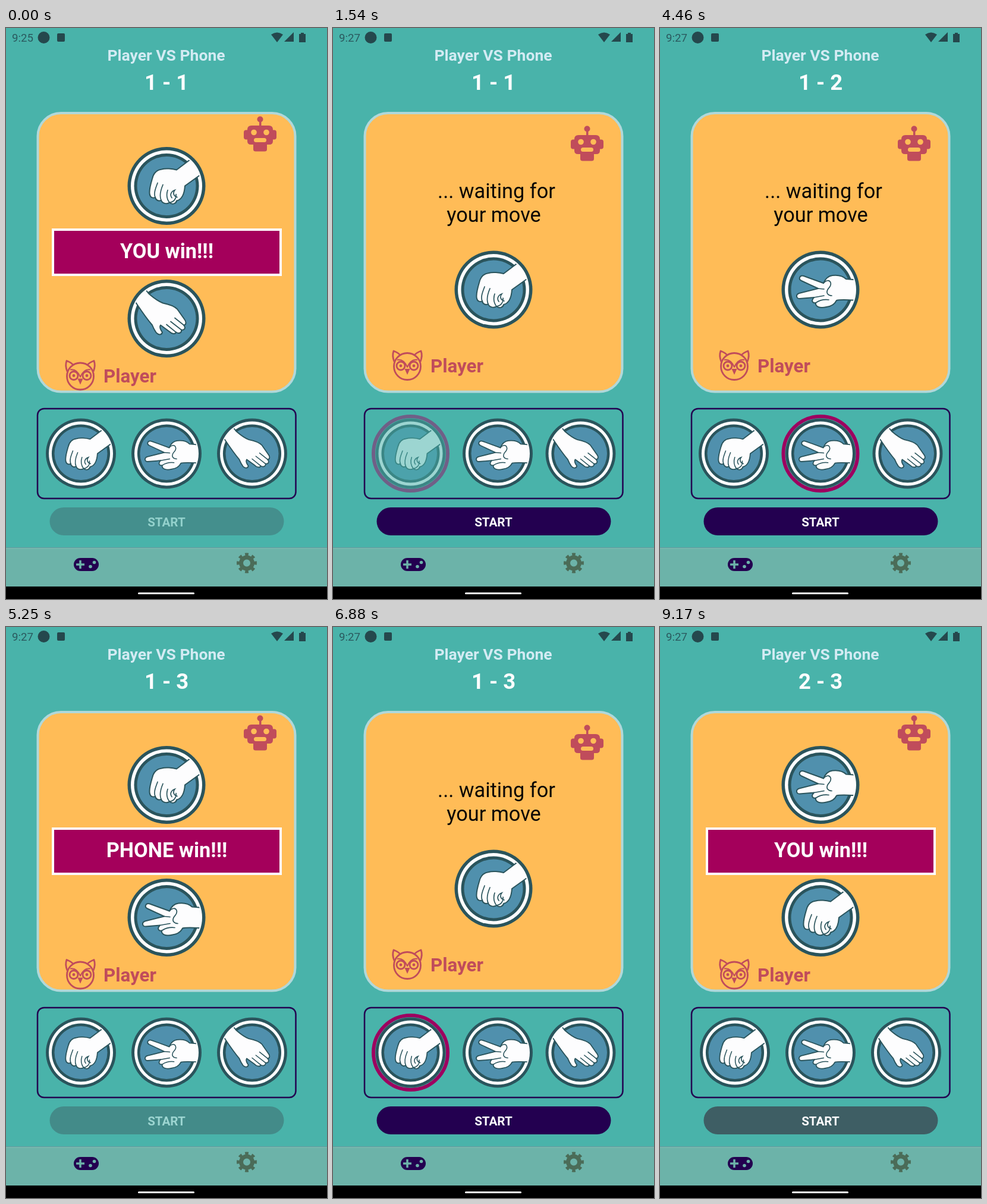
Animation, 540 px wide and 960 px high, one loop 9.21 s. Source, as an HTML page:

```html
<!DOCTYPE html>
<html lang="en">
<head>
<meta charset="utf-8">
<title>Hand game</title>
<style>
  html, body { margin: 0; width: 100%; height: 100%; overflow: hidden; background: #49b3aa; }
  svg { display: block; width: 100%; height: 100%; }
  text { font-family: Roboto, sans-serif; font-weight: 700; }
  .mid { text-anchor: middle; }
  .plain { font-weight: 400; }
  .line { fill: none; stroke: #2a545c; stroke-width: 1.7; stroke-linecap: round; }
  .hand { fill: #fdfdfe; stroke: #2a545c; stroke-width: 2; stroke-linejoin: round; }
  .owl { fill: none; stroke: #c04c5b; stroke-width: 2.8; stroke-linejoin: round; }
</style>
</head>
<body>
<svg viewBox="0 0 540 960">
  <defs>
    <clipPath id="inside"><circle r="58"/></clipPath>
    <g id="disc">
      <circle r="65.5" fill="#2a545c"/>
      <circle r="60" fill="#fdfdfe"/>
      <circle r="54.5" fill="#2a545c"/>
      <circle r="49.5" fill="#5090ad"/>
    </g>
    <g id="rock">
      <use href="#disc"/>
      <g clip-path="url(#inside)">
        <path class="hand" d="M17-27C10-29-2-30-8-28C-17-27-22-21-24-12C-27-2-30 9-28 15C-27 20-22 21-19 19C-18 25-12 26-9 24C-7 30 1 31 5 28C10 32 16 30 17 25C26 23 30 14 31 0L70-28L50-52Z"/>
        <path class="line" d="M-19 19C-22 12-18 3-15-5M-9 24C-13 15-9 5-6-2M5 28C-1 20 0 13 2 7M5 28C12 27 17 22 16 14M9 20C5 15 8 9 14 7C10 12 12 17 18 19"/>
      </g>
    </g>
    <g id="paper">
      <use href="#disc"/>
      <g clip-path="url(#inside)">
        <path class="hand" d="M-64-42L-44-60L-30-42C-22-35-14-29-6-26C4-24 13-21 18-16L30 1C34 6 33 11 29 11C33 16 30 20 25 19C26 24 21 26 16 23C15 27 9 26 5 22L-10 11C-12 14-10 19-7 23C-8 28-13 28-17 24C-20 20-22 16-24 11C-30 4-41-11-51-26Z"/>
        <path class="line" d="M29 11L14-1M25 19L7 5M16 23L0 10"/>
      </g>
    </g>
    <g id="scissors">
      <use href="#disc"/>
      <g clip-path="url(#inside)">
        <path class="hand" d="M66-16L43-18C38-23 29-25 20-24C12-23 8-18 5-11L-28-23C-35-25-38-18-32-15L-4-2L-36 6C-42 8-41 15-35 15L-11 13C-16 18-14 23-8 22C-9 28-2 32 10 29C19 28 24 24 27 18C34 16 42 17 66 18Z"/>
        <path class="line" d="M-4-2L6-1M5-11C9-16 15-17 17-12C19-6 14-4 12 0C9 6 13 10 19 10M-11 13L6 10M-8 22C-2 18 6 16 14 17"/>
      </g>
    </g>
  </defs>

  <rect width="540" height="960" fill="#49b3aa"/>

  <!-- status bar -->
  <g fill="#25484d">
    <text id="clock" class="plain" x="10" y="23" font-size="18.6" fill="#2b5a5f"></text>
    <circle cx="63.500" cy="16" r="10"/>
    <rect x="86" y="9" width="13" height="14" rx="2"/>
    <path d="M446 11Q456 4 466 11L456 24Z"/>
    <path d="M484 7V23H468Z"/>
    <path d="M493 10H496V8H501V10H504V24H493Z"/>
  </g>

  <text class="mid" x="269.500" y="55" font-size="26.5" fill="#d3ebf3">Player VS Phone</text>
  <text id="score" class="mid" x="270" y="104" font-size="36.5" fill="#fdfdfe"></text>

  <!-- board -->
  <rect x="53.500" y="143" width="433" height="468.500" rx="39" fill="#ffbc57" stroke="#b0d8da" stroke-width="4"/>
  <g id="robot" fill="#c04c5b">
    <circle cx="427.500" cy="169.500" r="5"/>
    <rect x="426" y="170" width="3.500" height="12"/>
    <rect x="400" y="187.500" width="55" height="16" rx="4"/>
    <path d="M413 180H442Q449 180 449 187V206Q449 212 443 212H412Q406 212 406 206V187Q406 180 413 180Z"/>
    <path d="M416 208H439V220Q439 223.500 435 223.500H420Q416 223.500 416 220Z"/>
    <g fill="#ffbc57">
      <circle cx="417" cy="191.500" r="4.800"/>
      <circle cx="438" cy="191.500" r="4.800"/>
      <rect x="417" y="201" width="21" height="7" rx="3.500"/>
    </g>
  </g>
  <g id="player">
    <g class="owl">
      <circle cx="125" cy="569" r="22.500"/>
      <path d="M103 561Q99 551 102 543Q110 546 113 550M147 561Q151 551 148 543Q140 546 137 550"/>
      <path d="M108 558Q119 556 125 570Q131 556 142 558" stroke-width="2"/>
      <circle cx="114" cy="568" r="7"/>
      <circle cx="136" cy="568" r="7"/>
    </g>
    <g fill="#c04c5b">
      <circle cx="114" cy="568" r="2.400"/>
      <circle cx="136" cy="568" r="2.400"/>
      <path d="M120.500 573H129.500L125 583Z"/>
      <text x="164" y="579" font-size="31.300">Player</text>
    </g>
  </g>

  <g id="waiting">
    <text class="mid plain" font-size="34.300" fill="#0b0805"><tspan x="275" y="286">... waiting for</tspan><tspan x="270.500" y="326">your move</tspan></text>
    <use id="chosen" transform="translate(270 440)"/>
  </g>
  <g id="result">
    <use id="theirs" transform="translate(270 265.500)"/>
    <use id="mine" transform="translate(270 488.500)"/>
    <rect x="79" y="339" width="383" height="76" fill="#a4005b" stroke="#fdfdfe" stroke-width="4"/>
    <text id="verdict" class="mid" x="270.500" y="387" font-size="34.300" fill="#fdfdfe"></text>
  </g>

  <!-- moves -->
  <rect x="53" y="640" width="434.500" height="151" rx="11" fill="none" stroke="#230050" stroke-width="2.500"/>
  <g id="moves"></g>

  <g id="start">
    <rect id="pill" x="73.500" y="806" width="394" height="47" rx="23.500"/>
    <text class="mid" x="270" y="838" font-size="20.700" fill="#fdfdfe">START</text>
  </g>

  <!-- tab bar -->
  <rect y="874" width="540" height="65" fill="#6cb3a9"/>
  <rect y="873" width="540" height="1.500" fill="#5f9c9f"/>
  <rect y="874.500" width="540" height="1" fill="#86bfb5"/>
  <rect x="114" y="891" width="42" height="22" rx="11" fill="#230050"/>
  <path d="M118 902H132M125 895V909" stroke="#6cb3a9" stroke-width="3.500"/>
  <g fill="#6cb3a9"><circle cx="142" cy="905.500" r="2.800"/><circle cx="148.500" cy="898.500" r="2.800"/></g>
  <g transform="translate(405 899.500)" fill="none" stroke="#4b6c58">
    <circle r="9.500" stroke-width="7"/>
    <circle r="14.200" stroke-width="5.500" pathLength="80" stroke-dasharray="5 5" stroke-dashoffset="2.500"/>
  </g>
  <rect y="939" width="540" height="21"/>
  <rect x="222" y="949" width="95" height="3" rx="1.500" fill="#fdfdfe"/>
</svg>

<script>
  const LOOP = 9210, PRESS = 150, RELEASE = 250, DIM = 0.2;
  const moves = ['rock', 'scissors', 'paper'];
  // Each round: result shown at `at`, next move tapped at `next`.
  const rounds = [
    { at: -90, next: 1440, score: '1 - 1', who: 'YOU', theirs: 'rock', mine: 'paper' },
    { at: 2450, next: 4000, score: '1 - 2', who: 'PHONE', theirs: 'paper', mine: 'rock' },
    { at: 5150, next: 6480, score: '1 - 3', who: 'PHONE', theirs: 'rock', mine: 'scissors' },
    { at: 7380, next: Infinity, score: '2 - 3', who: 'YOU', theirs: 'scissors', mine: 'rock' }
  ];
  const centers = { none: [126, 270, 414], rock: [130.5, 277, 416.5], scissors: [124, 270, 416.5] };

  const $ = id => document.getElementById(id);
  const show = (id, on) => $(id).setAttribute('display', on ? 'inline' : 'none');
  const shift = (id, y) => $(id).setAttribute('transform', `translate(0 ${y})`);
  const ease = p => p < 0.5 ? 2 * p * p : 1 - 2 * (1 - p) ** 2;

  // Opacity of a touchable around a tap released at `tap`.
  function tapOpacity(t, tap) {
    const d = t - tap;
    if (d <= -PRESS || d >= RELEASE) return 1;
    const level = d < 0 ? -d / PRESS : d / RELEASE;
    return DIM + (1 - DIM) * ease(level);
  }

  $('moves').innerHTML = moves.map(m =>
    `<g id="move-${m}"><circle r="62.5" fill="none" stroke="#9d0060" stroke-width="6"/>` +
    `<use href="#${m}" transform="scale(.9)"/></g>`).join('');

  function render(t) {
    const index = rounds.findLastIndex(r => t >= r.at);
    const round = rounds[index], following = rounds[index + 1];
    const waiting = t >= round.next;
    const picked = waiting ? following.mine : 'none';

    $('clock').textContent = t < 40 ? '9:25' : '9:27';
    $('score').textContent = round.score;
    $('verdict').textContent = round.who + ' win!!!';
    $('theirs').setAttribute('href', '#' + round.theirs);
    $('mine').setAttribute('href', '#' + round.mine);
    if (waiting) $('chosen').setAttribute('href', '#' + picked);
    show('waiting', waiting);
    show('result', !waiting);
    shift('robot', waiting ? 0 : -16);
    shift('player', waiting ? 0 : 16.5);

    moves.forEach((m, i) => {
      const button = $('move-' + m);
      button.setAttribute('transform', `translate(${centers[picked][i]} 715.5)`);
      button.firstChild.setAttribute('display', m === picked ? 'inline' : 'none');
      button.setAttribute('opacity', following && following.mine === m ? tapOpacity(t, round.next) : 1);
    });

    $('pill').setAttribute('fill', waiting ? '#230050' : '#3e5e64');
    $('start').setAttribute('opacity', Math.min(...rounds.map(r => tapOpacity(t, r.at))));
  }

  const begin = performance.now();
  function tick(now) {
    render(Math.max(0, now - begin) % LOOP);
    requestAnimationFrame(tick);
  }
  render(0);
  requestAnimationFrame(tick);
</script>
</body>
</html>
```
